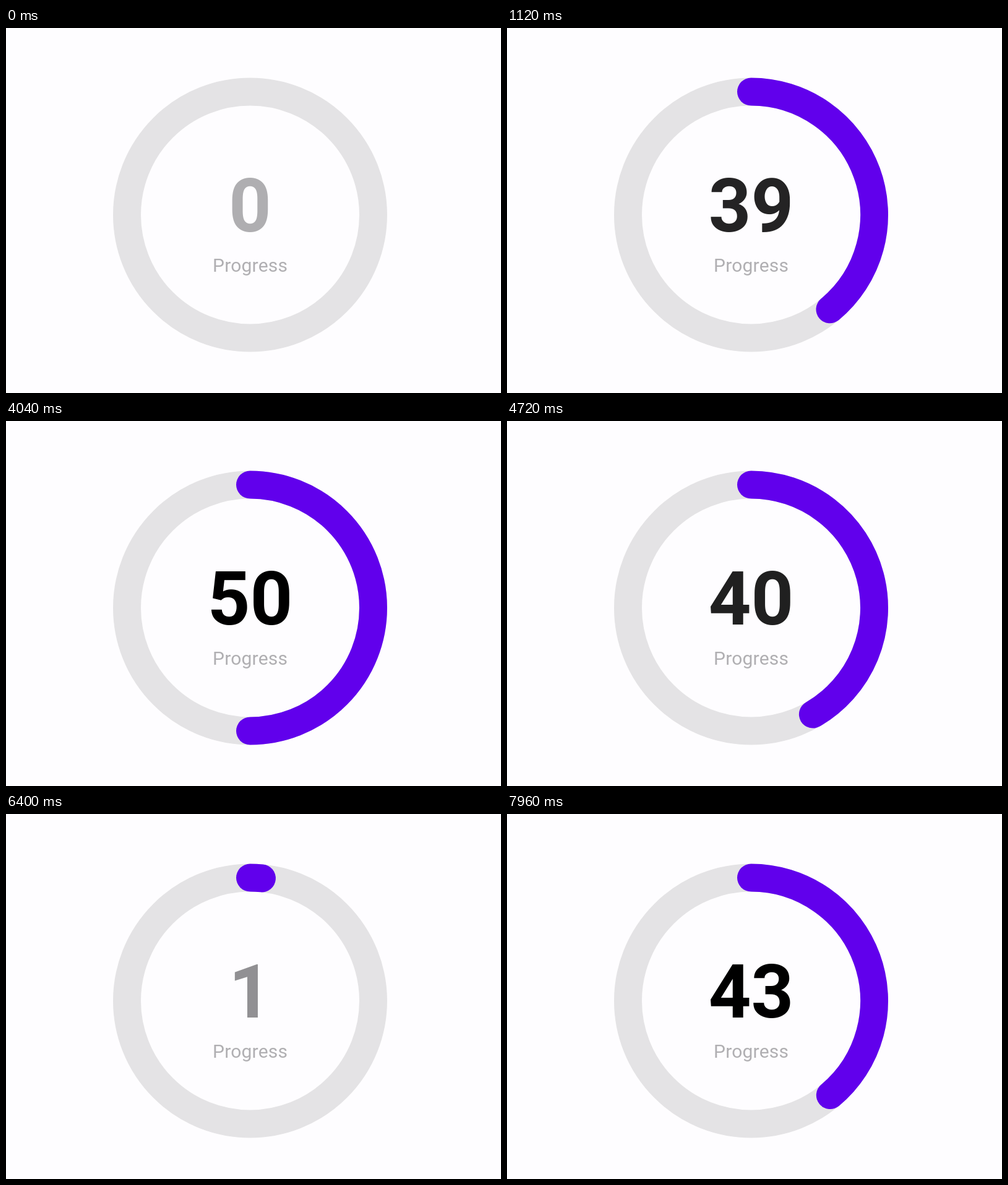
These frames come from a looping animation (800x590 px, 8 s). An HTML page:

```html
<!DOCTYPE html>
<html lang="en">
<head>
<meta charset="utf-8">
<title>Circular progress</title>
<style>
  html, body { margin: 0; width: 100%; height: 100%; overflow: hidden; background: #fefdff; }
  svg { display: block; width: 100%; height: 100%; }
  text { font-family: Roboto, Arial, sans-serif; text-anchor: middle; }
  .ring { fill: none; stroke-width: 45; }
</style>
</head>
<body>
<svg viewBox="0 0 800 590">
  <circle class="ring" cx="394.5" cy="302" r="199" stroke="#e4e3e5"/>
  <path class="ring" id="arc" stroke="#6100ec" stroke-linecap="round"/>
  <text id="value" x="394.5" y="329" font-size="120" font-weight="700">0</text>
  <text x="394.6" y="394" font-size="30" letter-spacing=".2" fill="#b0afb2">Progress</text>
</svg>
<script>
const LOOP = 8000, CX = 394.5, CY = 302, R = 199;
const MIN_SWEEP = 0.12; // degrees; below this no cap is drawn
const GRAY = [175, 174, 177];
const arc = document.getElementById('arc');
const value = document.getElementById('value');

// The arc starts slightly later than the number.
const moves = [
  { from: 0, to: 50, text: 610, arc: 625, span: 985 },
  { from: 50, to: 0, text: 4483, arc: 4491, span: 1049 },
  { from: 0, to: 10, text: 6180, arc: 6190, span: 1000 },
  { from: 10, to: 100, text: 7658.5, arc: 7677, span: 1000 }
];

// cubic-bezier(0.4, 0, 0.2, 1)
function ease(x) {
  if (x <= 0) return 0;
  if (x >= 1) return 1;
  let lo = 0, hi = 1;
  for (let i = 0; i < 24; i++) {
    const s = (lo + hi) / 2, q = 1 - s;
    if (1.2 * q * q * s + 0.6 * q * s * s + s * s * s < x) lo = s; else hi = s;
  }
  return lo * lo * (3 - 2 * lo);
}

const mix = (a, b, k) => a + (b - a) * k;

function sample(t, key) {
  const m = moves.findLast(move => t >= move[key]) || moves[0];
  const k = ease((t - m[key]) / m.span);
  return {
    amount: mix(m.from, m.to, k),
    ink: mix(Math.sign(m.from), Math.sign(m.to), k)
  };
}

function drawArc(percent) {
  const deg = percent * 3.6;
  if (deg < MIN_SWEEP) return arc.removeAttribute('d');
  const a = deg * Math.PI / 180;
  const x = CX + R * Math.sin(a), y = CY - R * Math.cos(a);
  arc.setAttribute('d', `M${CX} ${CY - R}A${R} ${R} 0 ${deg > 180 ? 1 : 0} 1 ${x} ${y}`);
}

function draw(t) {
  drawArc(sample(t, 'arc').amount);
  const { amount, ink } = sample(t, 'text');
  value.textContent = Math.floor(amount);
  value.setAttribute('fill', `rgb(${GRAY.map(c => Math.round(c * (1 - ink)))})`);
}

let start;
function tick(now) {
  start ??= now;
  draw((now - start) % LOOP);
  requestAnimationFrame(tick);
}
draw(0);
requestAnimationFrame(tick);
</script>
</body>
</html>
```
